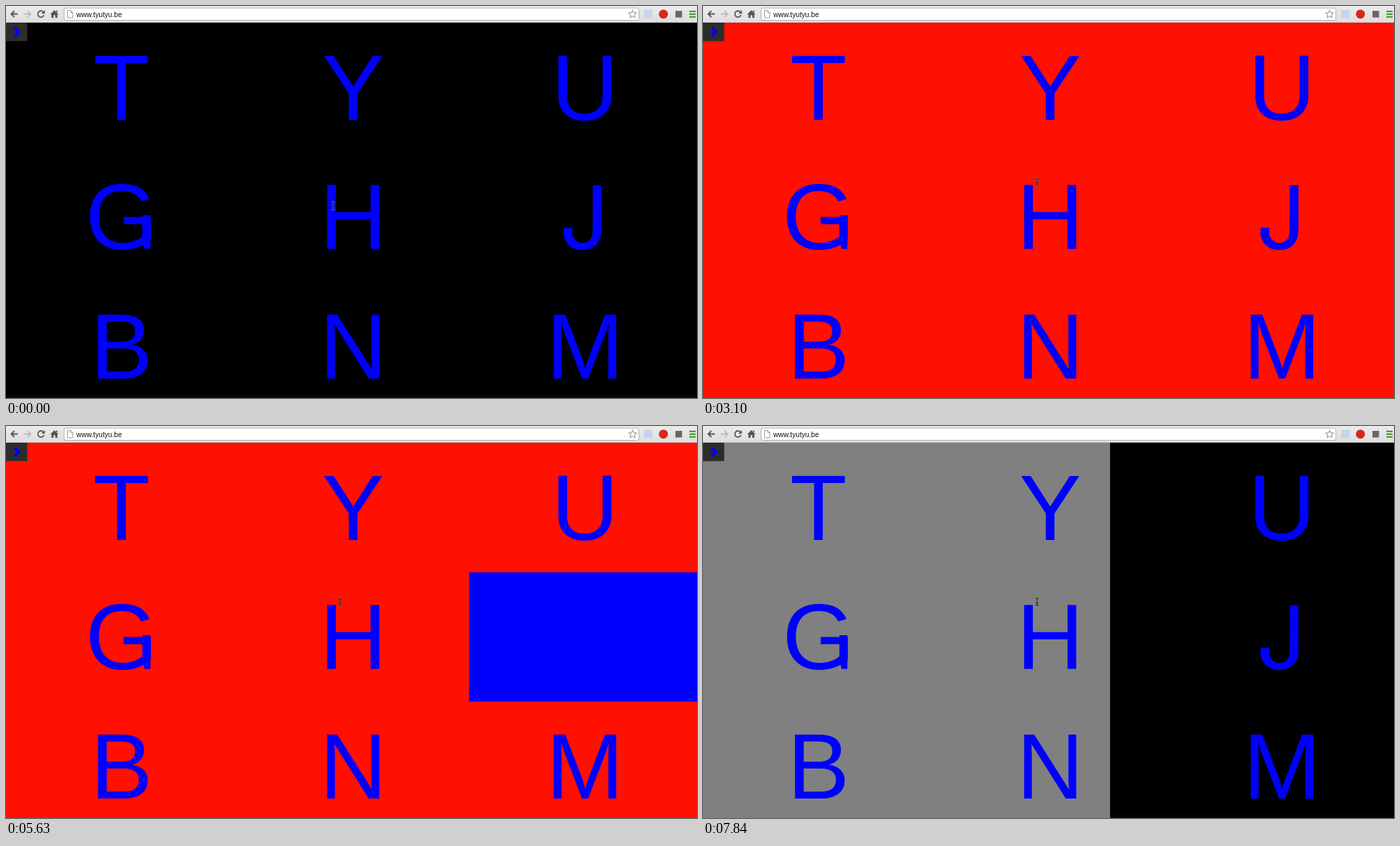
An HTML page for the animation above (7990 ms loop, 993 by 564 pixels).

```html
<!DOCTYPE html>
<html lang="en">
<head>
<meta charset="utf-8">
<title>Letter grid</title>
<style>
  html, body { margin: 0; width: 100%; height: 100%; overflow: hidden; background: #000; }
  svg { display: block; width: 993px; height: 564px; }
  text { font-family: "Liberation Sans", Arial, sans-serif; }
  .letters { font-size: 134px; text-anchor: middle; fill: #00f; }
  .url { font-size: 10.2px; fill: #111; }
  .icon { fill: none; stroke: #555; stroke-width: 1.8; }
</style>
</head>
<body>
<svg viewBox="0 0 993 564">
  <defs>
    <linearGradient id="chrome" x2="0" y2="1">
      <stop offset="0" stop-color="#ebebeb"/>
      <stop offset="1" stop-color="#dedede"/>
    </linearGradient>
    <!-- trims the top bar of the J -->
    <clipPath id="hook"><path d="M780 300H843.2V250H880V370H780z"/></clipPath>
    <path id="beam" d="M-2.5 -5.5Q0 -5.5 0 -3.5Q0 -5.5 2.5 -5.5M0 -4V4M-2.5 5.5Q0 5.5 0 3.5Q0 5.5 2.5 5.5M-1.5 1.5H1.5"/>
  </defs>

  <rect id="back" y="24" width="993" height="540"/>
  <rect id="floor" y="560" width="993" height="4" fill="#070707"/>
  <rect id="wipe" y="24" width="0" height="540" fill="#808080"/>
  <g id="letters" class="letters"></g>
  <path d="M196 301H207.5V349.5H199L196 337zM801.3 319H814V327H801.3z" fill="#00f"/>
  <rect id="cell" y="210.5" width="333" height="186" fill="#00f"/>

  <rect y="24" width="30.5" height="26.5" fill="#2c2c2c"/>
  <path d="M12.5 31.5L18.5 37.2L12.5 43" fill="none" stroke="#00f" stroke-width="4"/>

  <g id="cursor" fill="none">
    <use href="#beam" stroke="#999" stroke-opacity=".6" stroke-width="2.4"/>
    <use href="#beam" stroke="#1c1c1c" stroke-width="1"/>
  </g>

  <rect width="993" height="24" fill="url(#chrome)"/>
  <rect y="23" width="993" height="1" fill="#c4c4c4"/>
  <rect x="83.5" y="3" width="826" height="17.5" rx="2.5" fill="#fff" stroke="#b4b4b4"/>
  <path class="icon" d="M17 11.5H8M12 7L7.5 11.5L12 16"/>
  <path class="icon" d="M25.500 11.500H34.500M31 7L35.500 11.500L31 16" style="stroke:#bdbdbd"/>
  <path class="icon" d="M53.600 8.500A4.500 4.500 0 1 0 54.500 13"/>
  <path d="M55.800 6V11H50.800z" fill="#555"/>
  <path d="M69.500 6L75.500 12H73.800V17H70.800V13.200H68.300V17H65.300V12H63.500zM72 6.500H73.800V9.500L72 8z" fill="#555"/>
  <path d="M88.500 6.500H93L96 9.500V17H88.500zM93 6.500V9.500H96" fill="#fff" stroke="#999"/>
  <text class="url" x="101" y="15.500">www.tyutyu.be</text>
  <path id="star" fill="#fff" stroke="#858585"/>
  <rect x="917" y="5.500" width="12" height="12" fill="#c5d6ec"/>
  <circle cx="944.700" cy="11.700" r="6.500" fill="#d8261c"/>
  <rect x="962" y="7" width="9.500" height="9.500" fill="#666"/>
  <path d="M982 7.700H991M982 11.700H991M982 15.700H991" stroke="#2f9a12" stroke-width="2"/>
</svg>

<script>
const LOOP = 7990;
const G = 0, H = 1, J = 2, NONE = -1;
const COLUMN = 333, ROW = 186;
const el = id => document.getElementById(id);

// Each row holds from its time until the next one.
const CURSOR = [[0, [470, 287.5]], [140, [480, 254.5]], [410, [480, 253]]];
const LIT = [
  [0, NONE], [1160, H], [1310, NONE],
  [1610, H], [1760, G], [1900, NONE],
  [4290, H], [4590, NONE], [4740, H], [4890, NONE],
  [5330, H], [5480, NONE], [5630, J], [5780, NONE]
];
const RED = [[0, false], [3100, true], [3400, false], [3690, true], [6370, false]];
const WIPE = [
  [0, 0], [6370, 12], [6580, 91], [6930, 228], [7080, 287],
  [7230, 346], [7380, 405], [7540, 467], [7690, 526], [7840, 585]
];

const at = (steps, t) => steps.findLast(([start]) => start <= t)[1];

[..."TYUGHJBNM"].forEach((letter, i) => {
  const text = document.createElementNS("http://www.w3.org/2000/svg", "text");
  text.textContent = letter;
  text.setAttribute("x", 166 + (i % 3) * COLUMN);
  text.setAttribute("y", 163.5 + Math.floor(i / 3) * ROW);
  if (letter === "J") text.setAttribute("clip-path", "url(#hook)");
  el("letters").append(text);
});

const starPoints = Array.from({ length: 10 }, (_, i) => {
  const radius = i % 2 ? 2.7 : 6.2, angle = i * Math.PI / 5;
  return [900.5 + radius * Math.sin(angle), 12 - radius * Math.cos(angle)];
});
el("star").setAttribute("d", `M${starPoints.join("L")}z`);

function draw(now) {
  const t = now % LOOP;
  const red = at(RED, t), lit = at(LIT, t), [x, y] = at(CURSOR, t);
  el("back").setAttribute("fill", red ? "#ff1000" : "#000");
  el("floor").setAttribute("visibility", red ? "hidden" : "visible");
  el("wipe").setAttribute("width", at(WIPE, t));
  el("cell").setAttribute("visibility", lit === NONE ? "hidden" : "visible");
  el("cell").setAttribute("x", lit * COLUMN - 0.5);
  el("cursor").setAttribute("transform", `translate(${x} ${y})`);
}

const start = performance.now();
function tick() {
  draw(performance.now() - start);
  requestAnimationFrame(tick);
}
tick();
</script>
</body>
</html>
```
